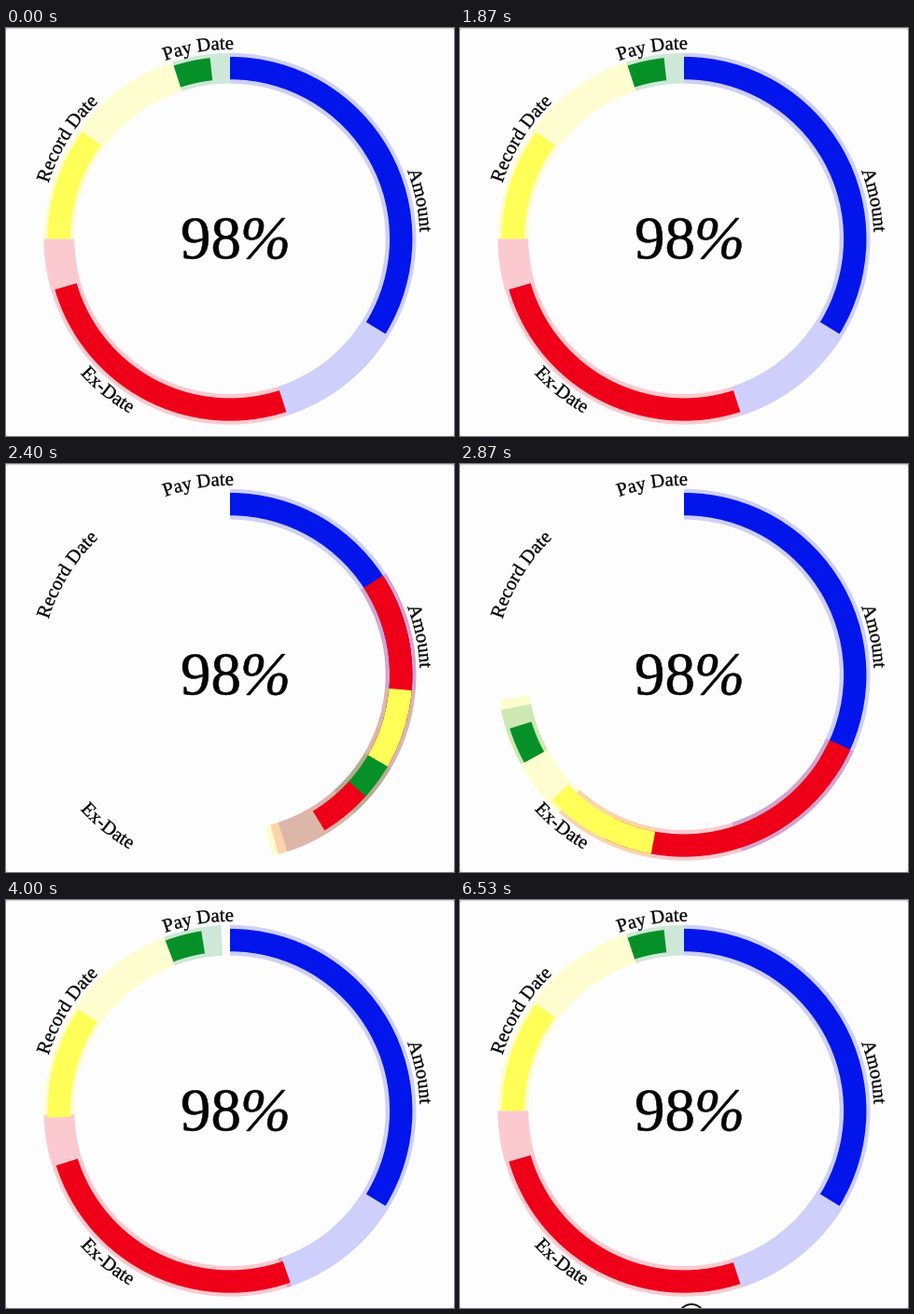
Animation, 480 px wide and 438 px high, one loop 6.59 s. Source, as a matplotlib script:

```python
import numpy as np
import matplotlib.pyplot as plt
from matplotlib.animation import FuncAnimation
from matplotlib.patches import Circle, FancyBboxPatch, PathPatch, Wedge
from matplotlib.textpath import TextPath
from matplotlib.transforms import Affine2D

W, H = 480, 438
CX, CY = 240, 226.3
LOOP, FRAMES = 6590, 99
STEP = 200 / 3            # ms of animation time per frame
RESET, START, DURATION = 1900, 1853, 2435
CURSOR_AT = 6500
FONT = {"family": "Liberation Serif"}
ITALIC = {"family": "Liberation Serif", "style": "italic"}
INK = "#050505"

# share of the ring, filled fraction, solid colour, tint colour
SLICES = [
    (0.45, 0.75, "#0216ec", "#1018f0"),
    (0.30, 0.85, "#ee0018", "#f00019"),
    (0.20, 0.50, "#ffff58", "#ffff19"),
    (0.05, 0.65, "#069128", "#109640"),
]
# text, start angle clockwise from the top, baseline radius, reads clockwise
LABELS = [
    ("Amount", 69.0, 203.5, True),
    ("Ex-Date", 228.0, 216, False),
    ("Record Date", 287.0, 203.5, True),
    ("Pay Date", 340.0, 203.5, True),
]

fig = plt.figure(figsize=(W / 100, H / 100), dpi=100, facecolor="#cfcfd0")
ax = fig.add_axes([0, 0, 1, 1])
ax.set(xlim=(0, W), ylim=(H, 0))
ax.axis("off")
ax.add_patch(FancyBboxPatch((0, 1), W, H - 1, fc="#fefdfe", lw=0, zorder=0,
                            boxstyle="round,pad=0,rounding_size=3"))


def text_end(s, size):
    return TextPath((0, 0), s, size=size, prop=FONT).get_extents().x1


def advance(s, size):
    return text_end(s + "|", size) - text_end("|", size)


def draw_text(s, size, transform, font=FONT, weight=0.25):
    path = TextPath((0, 0), s, size=size, prop=font)
    ax.add_patch(PathPatch(transform.transform_path(path), fc=INK, ec=INK,
                           lw=weight, zorder=4))


def curved_text(s, start, radius, clockwise, size=20.6):
    for i, ch in enumerate(s):
        if ch == " ":
            continue
        left, right = advance(s[:i], size), advance(s[:i + 1], size)
        turn = np.degrees((left + right) / 2 / radius)
        angle = start + turn if clockwise else start - turn
        a = np.radians(angle)
        place = (Affine2D().translate((left - right) / 2, 0).scale(1, -1)
                 .rotate_deg(angle if clockwise else angle + 180)
                 .translate(CX + radius * np.sin(a), CY - radius * np.cos(a)))
        draw_text(ch, size, place)


def add_arc(outer, inner, color, alpha, zorder):
    arc = Wedge((CX, CY), outer, 0, 1, width=outer - inner,
                fc=color, alpha=alpha, lw=0, zorder=zorder)
    return ax.add_patch(arc)


def set_arc(arc, start, sweep):
    arc.set_theta1(start - 90)
    arc.set_theta2(start + sweep - 90)


arcs = []
start = 0
for share, fill, solid, tint in SLICES:
    sweep = 360 * share
    arcs.append((start, sweep, add_arc(199.5, 166.7, tint, 0.2, 1)))
    arcs.append((start, sweep * fill, add_arc(195.4, 171.1, solid, 1, 2)))
    start += sweep

for label in LABELS:
    curved_text(*label)
flip = Affine2D().scale(1, -1)
draw_text("98", 65, flip + Affine2D().translate(187, 247.3), weight=0.4)
draw_text("%", 65, flip + Affine2D().translate(251, 247.3), ITALIC, 0.4)

cursor = ax.add_patch(Circle((248, 448), 14, fc="#fefdfe", ec="#151515",
                             lw=1.4, zorder=5))

# cubic Bezier easing (0.25, 0.1, 0.25, 1)
s = np.linspace(0, 1, 400)
EASE_X = 0.75 * s * (1 - s) ** 2 + 0.75 * s**2 * (1 - s) + s**3
EASE_Y = 0.3 * s * (1 - s) ** 2 + 3 * s**2 * (1 - s) + s**3


def progress(t):
    if t < RESET:
        return 1.0
    return np.interp((t - START) / DURATION, EASE_X, EASE_Y)


def update(i):
    t = i * STEP
    p = progress(t)
    for start, sweep, arc in arcs:
        set_arc(arc, start * p, sweep)
    cursor.set_visible(t > CURSOR_AT)
    return [arc for _, _, arc in arcs] + [cursor]


anim = FuncAnimation(fig, update, frames=FRAMES, interval=LOOP / FRAMES,
                     repeat=True, repeat_delay=0, blit=False)
plt.show()
```
